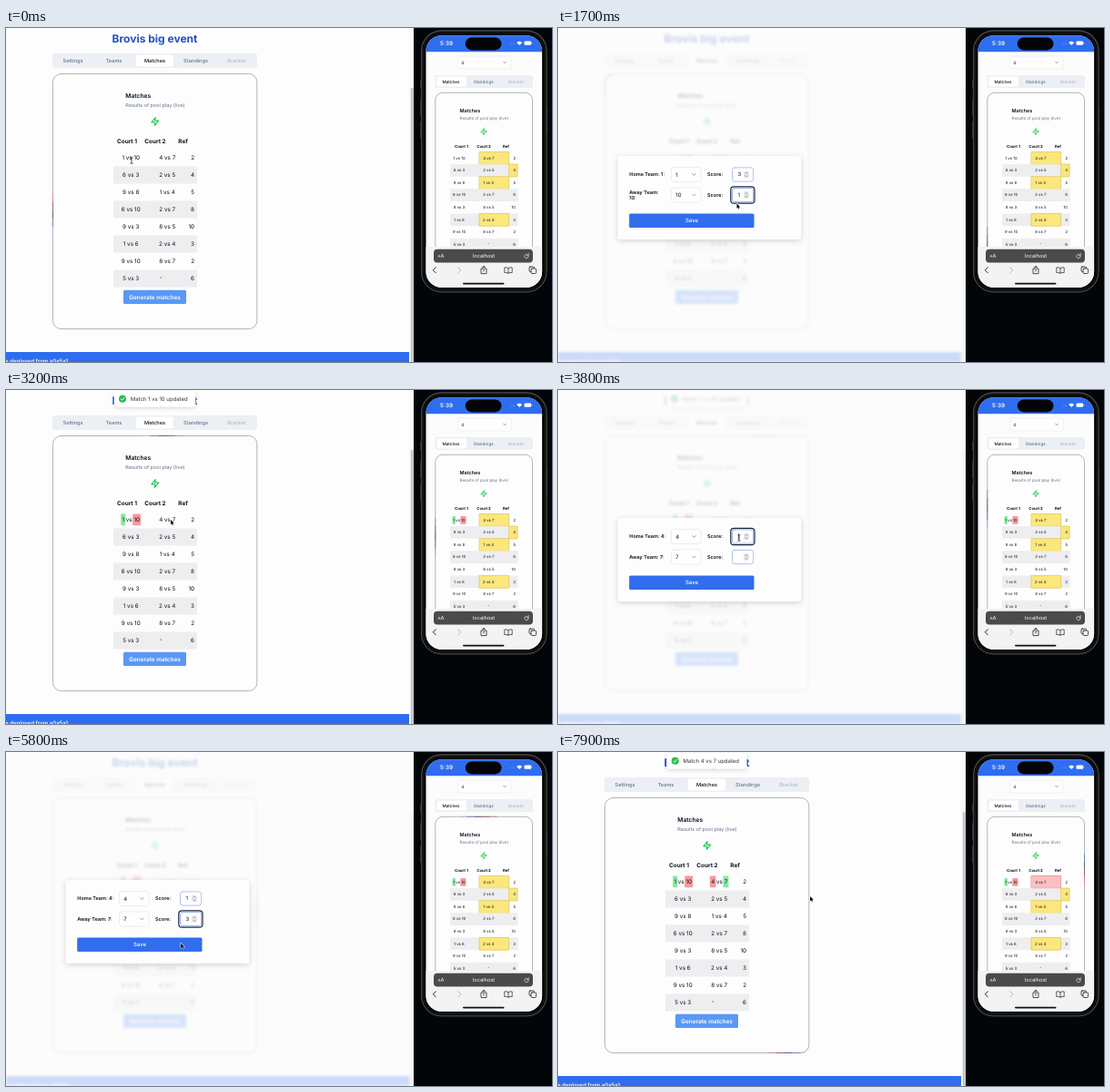
Animation of 600x368 px, one loop 8 s. Source, as an HTML page with a canvas:

```html
<!DOCTYPE html>
<html lang="en">
<head>
<meta charset="utf-8">
<title>Live matches</title>
<style>
  html, body { margin: 0; width: 100%; height: 100%; overflow: hidden; background: #000; }
  canvas { display: block; width: 600px; height: 368px; }
</style>
</head>
<body>
<canvas id="stage"></canvas>
<script>
const W = 600, H = 368, LOOP = 8000, STEP = 100, PANE = 448;
const BLUE = '#2f6df0', INK = '#0b0f19', GREY = '#64748b', PALE = '#b3bac6';
const GREEN = '#86e8a0', RED = '#f59a9c', YELLOW = '#fbe77c';
const dpr = Math.max(1, window.devicePixelRatio || 1);

function fit(canvas) {
  canvas.width = W * dpr;
  canvas.height = H * dpr;
  const c = canvas.getContext('2d');
  c.scale(dpr, dpr);
  c.textBaseline = 'middle';
  c.textRendering = 'geometricPrecision';
  return c;
}
const stage = fit(document.getElementById('stage'));
const pageCanvas = document.createElement('canvas');
const page = fit(pageCanvas);
let g = stage;

const rows = [
  ['1 vs 10', '4 vs 7', 2], ['6 vs 3', '2 vs 5', 4], ['9 vs 8', '1 vs 4', 5],
  ['6 vs 10', '2 vs 7', 8], ['9 vs 3', '8 vs 5', 10], ['1 vs 6', '2 vs 4', 3],
  ['9 vs 10', '8 vs 7', 2], ['5 vs 3', '-', 6]
];

const clamp = v => Math.min(1, Math.max(0, v));
const ramp = (t, a, b) => clamp((t - a) / (b - a));
const smooth = v => v * v * (3 - 2 * v);
const easeOut = v => 1 - (1 - v) ** 3;
const font = (size, weight = 400) => `${weight} ${size}px Inter, "Liberation Sans", sans-serif`;

function box(x, y, x2, y2, r, fill, stroke, lw = 0.8) {
  g.beginPath();
  g.roundRect(x, y, x2 - x, y2 - y, r);
  if (fill) { g.fillStyle = fill; g.fill(); }
  if (stroke) { g.strokeStyle = stroke; g.lineWidth = lw; g.stroke(); }
}

function text(s, x, y, size, color = INK, weight = 400, align = 'left') {
  g.font = font(size, weight);
  g.textAlign = align;
  g.fillStyle = color;
  g.fillText(s, x, y);
}

function line(points, color, lw, close) {
  g.beginPath();
  points.forEach(([x, y], i) => i ? g.lineTo(x, y) : g.moveTo(x, y));
  if (close) g.closePath();
  g.strokeStyle = color;
  g.lineWidth = lw;
  g.lineCap = g.lineJoin = 'round';
  g.stroke();
}

function disc(x, y, r, fill) {
  g.beginPath();
  g.arc(x, y, r, 0, 7);
  g.fillStyle = fill;
  g.fill();
}

function chevron(x, y, s, color = '#777') {
  line([[x - s, y - s / 2], [x, y + s / 2], [x + s, y - s / 2]], color, 0.7);
}

function bolt(cx, cy, size) {
  const k = size / 24;
  const pts = [[13, 2], [3, 14], [12, 14], [11, 22], [21, 10], [12, 10]];
  line(pts.map(([x, y]) => [cx + (x - 12) * k, cy + (y - 12) * k]), '#22c951', size * 0.105, true);
}

// Card outline with a coloured glint that runs clockwise along it.
function card(x, y, x2, y2, r, pos, len) {
  box(x, y, x2, y2, r, '#fdfdfd', '#a2a2a5', 0.8);
  const total = 2 * (x2 - x + y2 - y) - (8 - 2 * Math.PI) * r;
  const colors = ['#a9b8dc', '#6a80b8', '#5a5a66', '#946068', '#d08488'];
  const part = len / colors.length;
  g.lineCap = 'butt';
  g.setLineDash([part, total - part]);
  colors.forEach((c, i) => {
    g.lineDashOffset = -(((pos - len / 2 + i * part - r) % total + total) % total);
    box(x, y, x2, y2, r, null, c, 0.9);
  });
  g.setLineDash([]);
}

function match(s, cx, y, size, win) {
  if (win) {
    g.font = font(size);
    const [home, away] = s.split(' vs ');
    const width = v => g.measureText(v).width;
    const left = cx - width(s) / 2, right = cx + width(s) / 2, p = size * 0.2, r = size * 0.15;
    box(left - p, y - size, left + width(home) + p, y + size, r, win === 'home' ? GREEN : RED);
    box(right - width(away) - p, y - size, right + p, y + size, r, win === 'home' ? RED : GREEN);
  }
  text(s, cx, y, size, INK, 400, 'center');
}

function toast(t, start, label) {
  const enter = easeOut(ramp(t, start, start + 350));
  const leave = ramp(t, start + 2000, start + 2400) ** 2;
  const p = enter * (1 - leave);
  if (t <= start || p <= 0) return;
  g.save();
  g.globalAlpha = 0.5 + 0.5 * p;
  g.translate(163.5, 9.8 - (1 - p) * 35);
  g.scale(0.6 + 0.4 * p, 0.6 + 0.4 * p);
  g.font = font(6);
  const half = g.measureText(label).width / 2 + 13.3;
  g.shadowColor = 'rgba(0,0,0,.16)';
  g.shadowBlur = 5 * dpr;
  g.shadowOffsetY = dpr;
  box(-half, -9, half, 9, 3.2, '#fff');
  g.shadowColor = 'transparent';
  disc(9.3 - half, 0, 4, '#2fb84a');
  line([[7.5 - half, 0.2], [8.8 - half, 1.5], [11.2 - half, -1.4]], '#fff', 1);
  text(label, 18 - half, 0.2, 6, '#333');
  g.restore();
}

function desktop(t) {
  box(0, 0, PANE, H, 0, '#fdfdfd');
  text('Brovis big event', 163.5, 12.8, 12, '#2450c4', 700, 'center');
  box(51, 28, 276, 44, 3, '#eceff4');
  box(143, 29.6, 184, 42.6, 2, '#fff');
  ['Settings', 'Teams', 'Matches', 'Standings', 'Bracket'].forEach((s, i) =>
    text(s, 73.5 + i * 45, 36.2, 5.6, i === 2 ? INK : i === 4 ? PALE : GREY, 500, 'center'));

  card(51.5, 50.5, 275.8, 331.5, 9, 844 + 0.085 * t, 46);
  text('Matches', 131.3, 75.2, 6.7, INK, 600);
  text('Results of pool play (live)', 131.3, 85, 5.5, GREY);
  bolt(163.8, 103, 10.5);
  text('Court 1', 122, 125.5, 6.4, INK, 700);
  text('Court 2', 152.3, 125.5, 6.4, INK, 700);
  text('Ref', 189.3, 125.5, 6.4, INK, 700);
  const first = t >= 2100 && 'home', second = t >= 6500 && 'away';
  rows.forEach(([a, b, ref], i) => {
    const y = 142.9 + i * 19.03;
    if (i % 2) box(118, y - 9.5, 210, y + 9.5, 0, '#eeeef0');
    match(a, 137.2, y, 6.3, i === 0 && first);
    match(b, b === '-' ? 170.2 : 177.2, b === '-' ? y - 1.5 : y, 6.3, i === 0 && second);
    text(ref, 207, y, 6.3, INK, 400, 'right');
  });
  box(129, 288.8, 198, 304, 1.5, '#5a98f6');
  text('Generate matches', 163.5, 296.6, 6.4, '#fff', 600, 'center');

  box(0, 357, 443, H, 0, BLUE);
  text('s deployed from a0a5a1', 68, 367.6, 6, '#fff', 600, 'right');
  box(443, 0, PANE, H, 0, '#f8f8f8');
  box(444.8, 66, 447.6, H + 4, 1.4, '#c2c2c4');
  toast(t, 2250, 'Match 1 vs 10 updated');
  toast(t, 6505, 'Match 4 vs 7 updated');
}

function numberInput(y, value, focus) {
  if (focus) box(189.8, y - 9.2, 216, y + 9.2, 3.5, '#fff', '#1c2742', 1.2);
  box(191.5, y - 7.6, 214.6, y + 7.6, 2.4, '#fff', focus ? '#7d9fe6' : '#9cb6ec', 0.8);
  text(value, 197.4, y + 0.2, 6);
  if (focus && !value) line([[198.5, y - 3], [198.5, y + 3]], '#222', 0.6);
  box(204, y - 4, 210, y + 4, 1.5, '#e9e9eb');
  line([[205.8, y - 1.2], [207, y - 2.5], [208.2, y - 1.2]], '#777', 0.6);
  line([[205.8, y + 1.2], [207, y + 2.5], [208.2, y + 1.2]], '#777', 0.6);
}

function modal(t, m) {
  const k = smooth(ramp(t, m.open, m.open + 200) * (1 - ramp(t, m.close, m.close + 150)));
  if (k <= 0) return;
  g.save();
  g.beginPath();
  g.rect(0, 0, PANE, H);
  g.clip();
  g.globalAlpha = k;
  g.fillStyle = '#fcfcfc';
  g.fillRect(0, 0, PANE, H);
  g.filter = `blur(${1.5 * dpr}px)`;
  g.globalAlpha = k * 0.23;
  g.drawImage(pageCanvas, 0, 0, W, H);
  g.filter = 'none';
  g.globalAlpha = k;
  const s = 0.95 + 0.05 * k;
  g.translate(166.3, 187);
  g.scale(s, s);
  g.translate(-166.3, -187);
  g.shadowColor = 'rgba(0,0,0,.17)';
  g.shadowBlur = 6 * dpr;
  g.shadowOffsetY = 1.5 * dpr;
  box(65.5, 141, 267.3, 233, 3, '#fdfdfd');
  g.shadowColor = 'transparent';

  text(`Home Team: ${m.home}:`, 78.3, 161.8, 5.5, INK, 600);
  if (m.away.length > 1) {
    text('Away Team:', 78.3, 181, 5.5, INK, 600);
    text(`${m.away}:`, 78.3, 187.2, 5.5, INK, 600);
  } else text(`Away Team: ${m.away}:`, 78.3, 184.2, 5.5, INK, 600);
  [[m.home, 161.5], [m.away, 184]].forEach(([team, y], i) => {
    box(124.5, y - 8, 157, y + 8, 2.5, '#fefefe', '#e6e9ee', 0.8);
    text(team, 129.2, y + 0.3, 6);
    chevron(149.5, y, 1.8);
    text('Score:', 164, y + 0.3, 5.5, INK, 600);
    const value = t >= m.typed[i] ? m.score[i] : '';
    numberInput(y, value, i ? t >= m.next : t < m.next);
  });
  box(78.2, 204.4, 215.5, 220.1, 1.5, '#316eee');
  text('Save', 147, 212.5, 6, '#fff', 500, 'center');
  g.restore();
}

const modals = [
  { open: 250, close: 1950, home: '1', away: '10', score: ['3', '1'], typed: [1000, 1600], next: 1300 },
  { open: 3350, close: 6350, home: '4', away: '7', score: ['1', '3'], typed: [4200, 5200], next: 4900 }
];

// time, x, y
const path = [
  [0, 138, 146], [300, 138, 146], [700, 199, 167], [1000, 199, 167], [1300, 200, 184],
  [1600, 200, 184], [1850, 190, 211], [1950, 190, 211], [2200, 189, 181], [2500, 189, 181],
  [3000, 181, 143], [3350, 181, 143], [3700, 199, 163], [4400, 199, 163], [4650, 199, 181],
  [5300, 199, 182], [5700, 192, 211], [6300, 194, 210], [6600, 194, 206], [6900, 194, 206],
  [7800, 277, 159], [8000, 277, 159]
];

function pointer(t) {
  const i = path.findIndex(p => p[0] > t);
  const a = path[i - 1], b = path[i], k = smooth(ramp(t, a[0], b[0]));
  const x = a[1] + (b[1] - a[1]) * k, y = a[2] + (b[2] - a[2]) * k;
  const beam = t <= 300 || (t >= 650 && t < 1700) || (t >= 3600 && t < 5450);
  if (beam) {
    line([[x, y - 3], [x, y + 3]], '#222', 0.8);
    line([[x - 1.3, y - 3.4], [x, y - 2.8], [x + 1.3, y - 3.4]], '#222', 0.6);
    line([[x - 1.3, y + 3.4], [x, y + 2.8], [x + 1.3, y + 3.4]], '#222', 0.6);
    return;
  }
  const arrow = [[0, 0], [0, 5.2], [1.2, 4.2], [2, 6], [2.9, 5.6], [2.1, 3.9], [3.7, 3.8]];
  line(arrow.map(([u, v]) => [x + u, y + v]), '#fff', 0.9, true);
  g.fillStyle = '#000';
  g.fill();
}

function phonePage(t) {
  box(496.5, 31, 555.5, 45, 2, '#fdfdfd', '#ececef', 0.7);
  text('4', 500.2, 38.3, 4.6);
  chevron(548, 38, 1.4);
  box(471.5, 52, 579, 66, 2.5, '#eceff4');
  box(473.5, 53.5, 506, 64.5, 1.5, '#fff');
  ['Matches', 'Standings', 'Bracket'].forEach((s, i) =>
    text(s, 489 + i * 35.7, 59.2, 4.6, [INK, GREY, PALE][i], 500, 'center'));

  card(471.8, 71.3, 578.5, 340, 8, 89 + 0.052 * (t - 6600), 42);
  text('Matches', 498.6, 91.1, 5.4, INK, 600);
  text('Results of pool play (live)', 498.6, 99.4, 4.5, GREY);
  bolt(525, 114.3, 8.5);
  text('Court 1', 493, 131.2, 4.3, INK, 700);
  text('Court 2', 517.2, 131.2, 4.3, INK, 700);
  text('Ref', 546, 131.2, 4.3, INK, 700);
  const lost = t >= 7000;
  rows.forEach(([a, b, ref], i) => {
    const y = 143.4 + i * 13.58;
    const mark = (x, x2, fill, edge) => box(x, y - 6.9, x2, y + 6.9, 0, fill, edge, 0.7);
    if (i % 2) box(488, y - 6.8, 562.5, y + 6.8, 0, '#eeeef0');
    if (i === 0 && lost) mark(520.3, 552.7, '#fcbfc0', '#ef7f82');
    else if ([0, 2, 5].includes(i)) mark(520.3, 552.7, YELLOW, '#dcc455');
    if (i === 1) mark(553, 562, YELLOW, '#dcc455');
    match(a, 498, y, 4.3, i === 0 && t >= 2100 && 'home');
    text(b, 530.3, b === '-' ? y - 1.2 : y, 4.3, INK, 400, 'center');
    text(ref, 560, y, 4.3, INK, 400, 'right');
  });
}

function safari() {
  box(460, 241, 592, 288, 0, '#f3f3f4');
  box(470, 243.7, 579, 258.6, 4, '#4a4a4c');
  text('A', 474.5, 252, 4.4, '#fff');
  text('A', 477.6, 251.5, 5.8, '#fff');
  text('localhost', 525, 251.5, 5.7, '#fff', 400, 'center');
  g.beginPath();
  g.arc(572, 251.5, 2.2, -0.3, 5);
  g.strokeStyle = '#fff';
  g.lineWidth = 0.6;
  g.stroke();
  line([[574.3, 248.6], [574.2, 250.6], [572.4, 250.6]], '#fff', 0.6);

  const ink = '#222';
  line([[472.3, 263.8], [469.3, 266.8], [472.3, 269.8]], ink, 1);
  line([[496.8, 263.8], [499.8, 266.8], [496.8, 269.8]], '#b5b5b8', 1);
  line([[523.5, 265], [522, 265], [522, 270.6], [528, 270.6], [528, 265], [526.5, 265]], ink, 0.8);
  line([[525, 268], [525, 262.4]], ink, 0.8);
  line([[523.3, 264], [525, 262.4], [526.7, 264]], ink, 0.8);
  line([[552, 264.8], [550, 263.8], [547.8, 264], [547.8, 269.6], [550, 269.4], [552, 270.3],
    [554, 269.4], [556.2, 269.6], [556.2, 264], [554, 263.8], [552, 264.8], [552, 270.3]], ink, 0.7);
  box(575, 263, 580.5, 268.5, 1, null, ink, 0.8);
  box(577, 265, 582.5, 270.5, 1, '#f3f3f4', ink, 0.8);
  box(502, 280.7, 547.5, 282.4, 0.8, '#111');
}

function phone(t) {
  box(PANE, 0, W, H, 0, '#030608');
  box(455, 57, 458, 67, 1, '#2c2d30');
  box(455, 78, 458, 97, 1, '#2c2d30');
  box(455, 103, 458, 122, 1, '#2c2d30');
  box(592, 86, 595.2, 117, 1, '#2c2d30');
  box(456.6, 3, 594, 290.8, 22, '#0a0a0b', '#45464a', 1.3);
  box(459, 5.4, 591.6, 288.4, 19.5, '#030303', '#1c1c1e', 0.8);
  g.save();
  g.beginPath();
  g.roundRect(461.5, 8.3, 127.6, 277.5, 17);
  g.clip();
  box(460, 6, 592, 290, 0, '#fcfcfc');
  phonePage(t);
  box(460, 6, 592, 26.3, 0, BLUE);
  safari();
  text('5:39', 484, 17, 6.3, '#fff', 600, 'center');
  box(504.8, 10.4, 544.5, 24.4, 7, '#050507');
  for (let i = 0; i < 4; i++) disc(554.4 + i * 1.5, 17.6, 0.4, 'rgba(255,255,255,.55)');
  g.beginPath();
  g.moveTo(564.2, 19);
  g.arc(564.2, 19, 4.2, -Math.PI * 0.76, -Math.PI * 0.24);
  g.fillStyle = '#fff';
  g.fill();
  box(569.5, 14.6, 577.2, 18.8, 1.2, '#fff');
  box(577.7, 16, 578.4, 17.4, 0.3, '#dfe7fb');
  g.restore();
}

function draw(now) {
  const t = Math.floor((now % LOOP) / STEP) * STEP;
  g = page;
  desktop(t);
  g = stage;
  g.drawImage(pageCanvas, 0, 0, W, H);
  modals.forEach(m => modal(t, m));
  phone(t);
  pointer(t);
}

let start;
function tick(now) {
  if (start === undefined) start = now;
  draw(now - start);
  requestAnimationFrame(tick);
}
draw(0);
requestAnimationFrame(tick);
</script>
</body>
</html>
```
